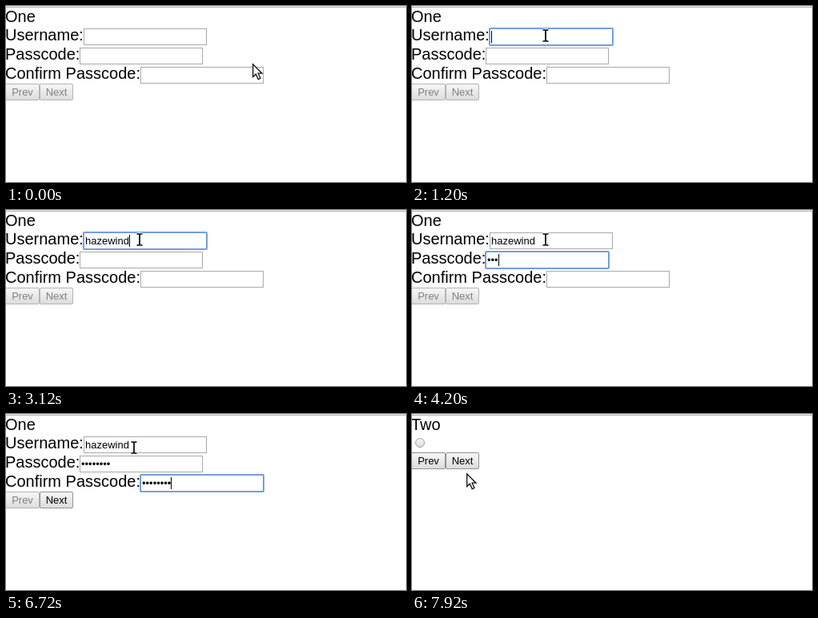
These frames come from a looping animation (500x220 px, 8000 ms). An HTML page:

```html
<!DOCTYPE html>
<html lang="en">
<head>
<meta charset="utf-8">
<title>Form wizard</title>
<style>
html, body { margin: 0; width: 100%; height: 100%; overflow: hidden; background: #fff; }
svg { display: block; font: 20px "Liberation Sans", Arial, sans-serif; }
.small { font-size: 13px; }
.crisp { shape-rendering: crispEdges; }
</style>
</head>
<body>
<svg width="500" height="220" viewBox="0 0 500 220">
  <defs>
    <linearGradient id="face" x2="0" y2="1">
      <stop stop-color="#f7f7f7"/><stop offset="1" stop-color="#dcdcdc"/>
    </linearGradient>
    <linearGradient id="hover" x2="0" y2="1">
      <stop stop-color="#fcfcfc"/><stop offset="1" stop-color="#e6e6e6"/>
    </linearGradient>
  </defs>
  <g class="crisp">
    <path d="M0 .5H500" stroke="#ececec"/>
    <path d="M0 1.5H500" stroke="#b2b2b2"/>
  </g>
  <g id="page"></g>
  <g id="pointer"></g>
</svg>
<script>
const LOOP = 8000, STEP = 120;
const SUBMIT = 7440;
const page = document.getElementById('page');
const pointer = document.getElementById('pointer');
const pen = document.createElement('canvas').getContext('2d');
pen.font = '13px "Liberation Sans", Arial, sans-serif';

// Each field: label, left edge, top edge, full value, focus time, keystroke times
const fields = [
  { label: 'Username:', x: 97, y: 28, value: 'hazewind', focus: 1200,
    keys: [2160, 2160, 2400, 2520, 2760, 2880, 3000, 3120] },
  { label: 'Passcode:', x: 92, y: 52, value: '•'.repeat(8), focus: 3600,
    keys: [3840, 3960, 4200, 4320, 4440, 4680, 4800, 4920] },
  { label: 'Confirm Passcode:', x: 168, y: 76, value: '•'.repeat(8), focus: 5160,
    keys: [5280, 5520, 5640, 5760, 6000, 6120, 6240, 6360] }
];
const FIELD_W = 154, FIELD_H = 21;

// Pointer moves: start, end, from, to
const moves = [
  [120, 840, [308, 72], [167, 37]],
  [6600, 7320, [167, 37], [73, 102]],
  [7680, 7920, [73, 102], [68, 74]]
];

const text = (x, y, str, attrs = '') => `<text x="${x}" y="${y}" ${attrs}>${str}</text>`;

function button(x, y, w, label, enabled, hovered) {
  const border = hovered ? '#7c7c7c' : enabled ? '#929292' : '#b4b4b4';
  return `<rect x="${x + .5}" y="${y + .5}" width="${w - 1}" height="20" rx="1.5"
    fill="url(#${hovered ? 'hover' : 'face'})" stroke="${border}"/>` +
    text(x + w / 2, y + 15, label,
      `class="small" text-anchor="middle" fill="${enabled ? '#000' : '#808080'}"`);
}

const buttons = (y, prev, next, hovered) =>
  button(-1, y, 43, 'Prev', prev) + button(42, y, 42, 'Next', next, hovered);

function field({ label, x, y, value, keys }, t, focused) {
  const typed = value.slice(0, keys.filter(k => k <= t).length);
  const caretOn = focused && !(t >= 1800 && t < 2160) && t < 6960;
  const caretX = Math.round(x + 1.9 + pen.measureText(typed).width);
  const frame = focused
    ? `<rect x="${x}" y="${y}" width="${FIELD_W}" height="${FIELD_H}" rx="1"
        fill="#fff" stroke="#739ee0" stroke-width="2"/>`
    : `<rect class="crisp" x="${x + .5}" y="${y + .5}" width="${FIELD_W - 1}"
        height="${FIELD_H - 1}" fill="#fff" stroke="#a9a9a9"/>`;
  return text(-1, y + 15, label) + frame +
    text(x + 2, y + 15, typed, 'class="small"') +
    (caretOn ? `<rect class="crisp" x="${caretX}" y="${y + 3}" width="1" height="15"/>` : '');
}

function pageOne(t, hovered) {
  const active = fields.filter(f => f.focus <= t).pop();
  return text(-1, 20, 'One') +
    fields.map(f => field(f, t, f === active)).join('') +
    buttons(97, false, t >= 6360, hovered);
}

// The hover look stays on Next until the pointer moves again
const pageTwo = t => text(-1, 20, 'Two') +
  '<circle cx="10" cy="36" r="5.5" fill="url(#face)" stroke="#a0a0a0"/>' +
  buttons(48, true, true, t < 7800);

function pointerAt(t) {
  let pos = moves[0][2];
  for (const [start, end, from, to] of moves) {
    if (t < start) break;
    const p = Math.min(1, (t - start) / (end - start));
    const e = p * p * (3 - 2 * p);
    pos = from.map((v, i) => v + (to[i] - v) * e);
  }
  return pos.map(Math.round);
}

function cursor([x, y], beam) {
  const ibeam = 'M-3.5-7H-1L0-6L1-7H3.5M0-6V6M-3.5 7H-1L0 6L1 7H3.5';
  const shape = beam
    ? `<path d="${ibeam}" fill="none" stroke="#fff" stroke-width="3.4"/>
       <path d="${ibeam}" fill="none" stroke="#000" stroke-width="1.7"/>`
    : `<path d="M.7.9V16.6L4.4 13.2L7.2 19.6L10 18.4L7.2 12.2H12Z"
        fill="#fff" stroke="#111" stroke-width="1.3"/>`;
  return `<g transform="translate(${x} ${y})">${shape}</g>`;
}

function render(t) {
  const pos = pointerAt(t), [x, y] = pos;
  const second = t >= SUBMIT;
  const row = fields[Math.floor((y - 28) / 24)];
  const beam = !second && row && y < 97 && x < row.x + FIELD_W;
  const onNext = y >= 97 && x >= 42 && x < 84;
  page.innerHTML = second ? pageTwo(t) : pageOne(t, onNext);
  pointer.innerHTML = cursor(pos, beam);
}

let shown = -1;
function tick() {
  const t = Math.floor(performance.now() % LOOP / STEP) * STEP;
  if (t !== shown) render(shown = t);
  requestAnimationFrame(tick);
}
tick();
</script>
</body>
</html>
```
